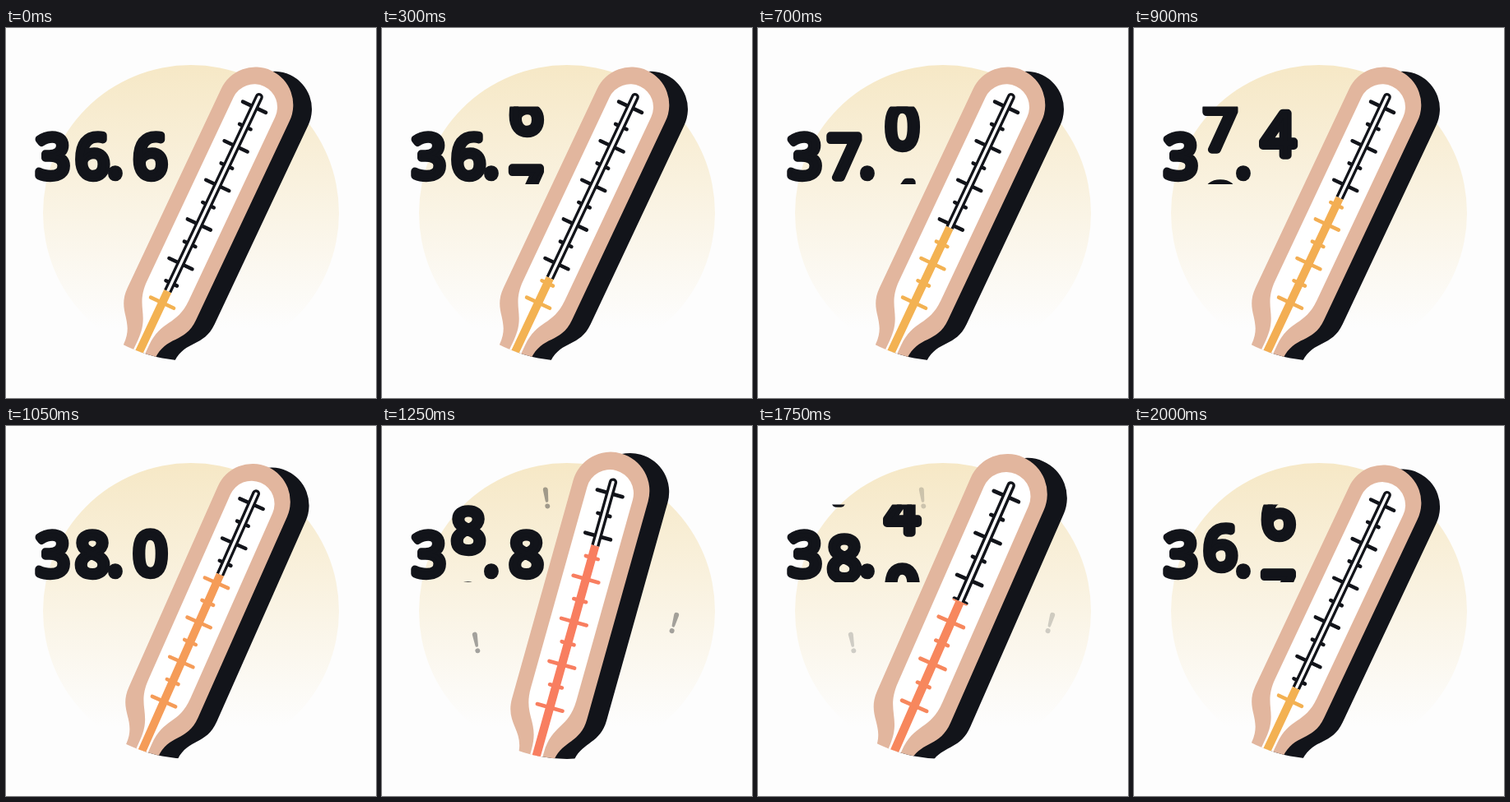
An HTML page with a canvas that plays this animation: 450x450 px, repeating every 2.05 s.

```html
<!DOCTYPE html>
<html lang="en">
<head>
<meta charset="utf-8">
<title>Thermometer</title>
<style>
html, body { margin: 0; width: 100%; height: 100%; overflow: hidden; background: #fdfdfd; }
canvas { display: block; width: 450px; height: 450px; }
</style>
</head>
<body>
<canvas id="stage"></canvas>
<script>
const LOOP = 2050, STEP = 50, SIZE = 450;
const INK = '#12141a', PINK = '#e2b69e', PAPER = '#fdfdfd';
const UNITS = [6, 7, 8, 9], TENTHS = [6, 7, 0, 4, 0, 8, 2];
const BASE = 181.5;
const canvas = document.getElementById('stage');
const c = canvas.getContext('2d');
const ratio = window.devicePixelRatio || 1;
canvas.width = canvas.height = SIZE * ratio;

const clamp = x => Math.min(1, Math.max(0, x));
const ramp = (t, a, b) => clamp((t - a) / (b - a));
const ease = (t, a, b) => { const x = ramp(t, a, b); return x * x * (3 - 2 * x); };
const mix = (a, b, k) => a + (b - a) * k;

const sky = c.createLinearGradient(0, 45, 0, 365);
sky.addColorStop(0, '#f6e8c6');
sky.addColorStop(1, PAPER);

// Round-topped capsule that narrows into a neck.
function capsule(color, top, r, y1, neck, y2) {
  const h = (y2 - y1) / 2;
  c.beginPath();
  c.arc(0, top, r, Math.PI, 0);
  c.lineTo(r, y1);
  c.bezierCurveTo(r, y1 + h, neck, y2 - h, neck, y2);
  c.lineTo(neck, 420);
  c.lineTo(-neck, 420);
  c.lineTo(-neck, y2);
  c.bezierCurveTo(-neck, y2 - h, -r, y1 + h, -r, y1);
  c.fillStyle = color;
  c.fill();
}

function line(color, width, x1, y1, x2, y2) {
  c.strokeStyle = color;
  c.lineWidth = width;
  c.beginPath();
  c.moveTo(x1, y1);
  c.lineTo(x2, y2);
  c.stroke();
}

function within(x, y, w, h, draw) {
  c.save();
  c.beginPath();
  c.rect(x, y, w, h);
  c.clip();
  draw();
  c.restore();
}

function scale(color, hollow) {
  for (let i = 0; i < 11; i++) {
    const y = 17.5 + 26.3 * i, half = i % 2 ? 7.5 : 15.5;
    line(color, 4.5, -half, y, half, y);
  }
  line(color, 10, 0, 4, 0, 420);
  if (hollow) line('#fff', 3.4, 0, 4, 0, 420);
}

function thermometer(t) {
  const back = 1 - ease(t, 1525, 2025);
  const level = 265 - 201 * ease(t, 25, 1525) * back;
  const heat = ease(t, 800, 1500) * back;
  const grow = 1 + 0.1 * ease(t, 1100, 1525) * back;
  const tilt = 25.2 - 10 * ease(t, 980, 1290) * (1 - ease(t, 1290, 1900));
  const liquid = `rgb(${mix(243, 250, heat)},${mix(178, 104, heat)},${mix(82, 102, heat)})`;

  c.save();
  // The lower half of the disc cuts the stem off.
  c.beginPath();
  c.arc(225, 225, 180, 0, Math.PI);
  c.lineTo(45, 0);
  c.lineTo(405, 0);
  c.clip();
  c.translate(230.7, 247.8);
  c.rotate(tilt * Math.PI / 180);
  c.scale(grow, grow);
  c.translate(0, -185);
  c.save();
  c.translate(22.7, -5);
  capsule(INK, 14.5, 46, 282, 21, 346);
  c.restore();
  capsule(PINK, 14.5, 46, 282, 21, 346);
  capsule('#fff', 17.5, 28, 264, 7.5, 334);
  c.lineCap = 'round';
  within(-60, -20, 120, level + 20, () => scale(INK, true));
  within(-60, level, 120, 500, () => scale(liquid, false));
  c.restore();
}

function glyph(s, x, y) {
  c.strokeText(s, x, y);
  c.fillText(s, x, y);
}

function reel(list, pos, x) {
  within(x - 32, 95.5, 64, 94.5, () =>
    list.forEach((d, i) => glyph(d, x, BASE + (i - pos) * 93)));
}

function reading(t) {
  let units, tenths;
  if (t <= 1550) {
    units = ease(t, 380, 620) + ease(t, 800, 1045) + ease(t, 1150, 1420);
    const p = 6 * ramp(t, 182, 1468), n = Math.floor(p);
    tenths = n + ease(p - n, 0, 1);
  } else {
    units = 3 * (1 - ease(t, 1550, 2050));
    tenths = 6 * (1 - ramp(t, 1550, 2040));
  }
  // A wide round outline gives the digits their soft, heavy look.
  c.font = '400 71px "Open Sans", "Noto Sans", sans-serif';
  c.textAlign = 'center';
  c.lineJoin = c.lineCap = 'round';
  c.lineWidth = 9.5;
  c.strokeStyle = c.fillStyle = INK;
  glyph('3', 57, BASE);
  glyph('.', 133, BASE - 0.5);
  reel(UNITS, units, 105);
  reel(TENTHS, tenths, 175.5);
}

function alarm(x, y, deg) {
  c.save();
  c.translate(x, y);
  c.rotate(deg * Math.PI / 180);
  c.beginPath();
  c.arc(0, -9.5, 3, Math.PI, 0);
  c.lineTo(1.8, 4);
  c.arc(0, 4, 1.8, 0, Math.PI);
  c.closePath();
  c.moveTo(3, 10.5);
  c.arc(0, 10.5, 3, 0, 7);
  c.fill();
  c.restore();
}

function draw(t) {
  c.setTransform(ratio, 0, 0, ratio, 0, 0);
  c.fillStyle = PAPER;
  c.fillRect(0, 0, SIZE, SIZE);
  c.fillStyle = sky;
  c.beginPath();
  c.arc(225, 225, 180, 0, 7);
  c.fill();

  c.globalAlpha = 0.5 * ramp(t, 1100, 1300) * (1 - ramp(t, 1580, 1850));
  c.fillStyle = INK;
  alarm(200, 87, -7);
  alarm(355.5, 239, 16);
  alarm(114.5, 263, -10);
  c.globalAlpha = 1;

  thermometer(t);
  reading(t);
}

const start = performance.now();
function tick() {
  const t = (performance.now() - start) % LOOP;
  draw(Math.floor(t / STEP) * STEP);
  requestAnimationFrame(tick);
}
tick();
</script>
</body>
</html>
```
